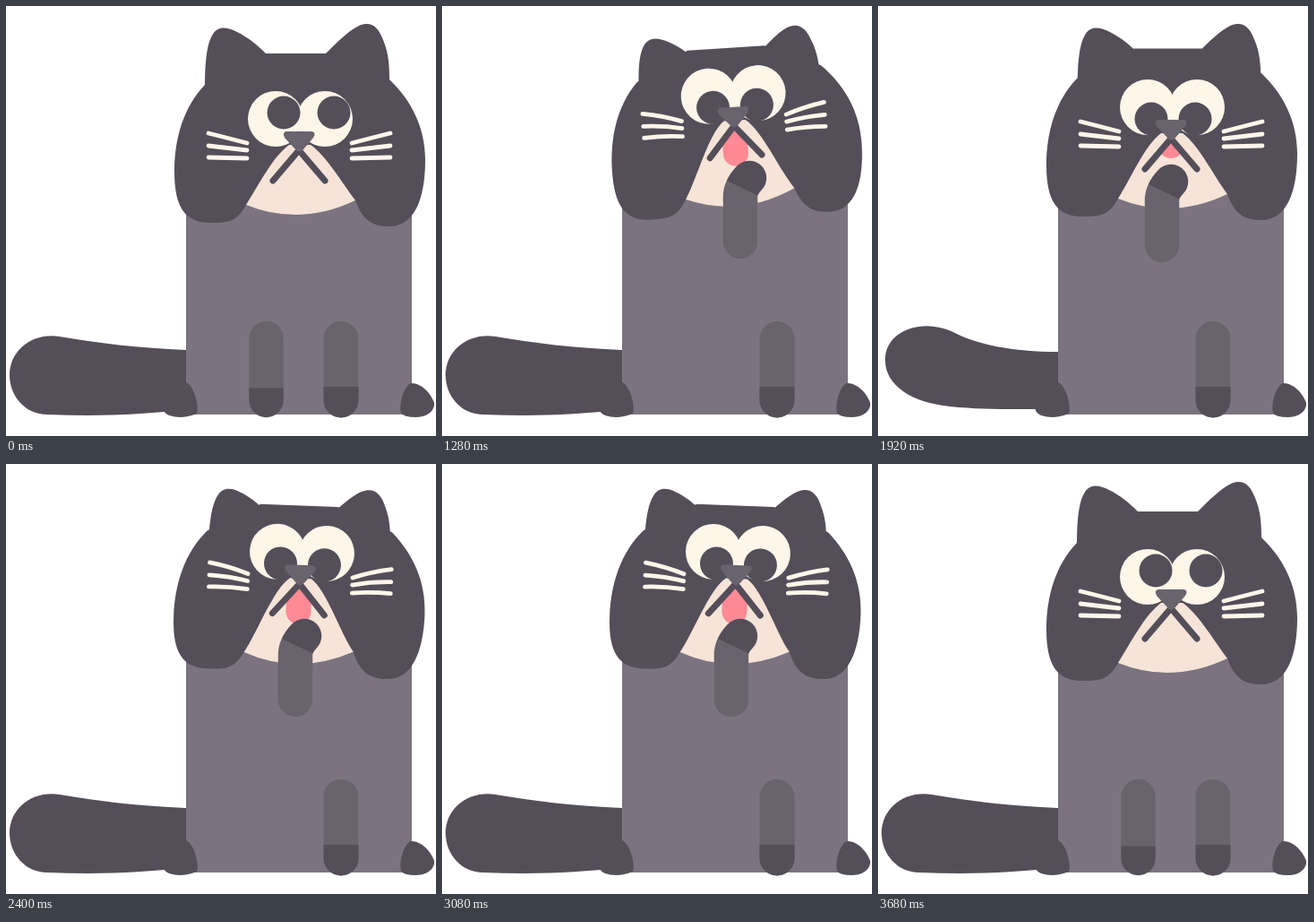
Recreate the animation shown at these times as an HTML page. Size 480 by 480 pixels, loop 3760 ms.

```html
<!DOCTYPE html>
<html lang="en">
<head>
<meta charset="utf-8">
<title>Cat washing its paw</title>
<style>
  html, body { margin: 0; width: 100%; height: 100%; overflow: hidden; background: #fff; }
  svg { display: block; width: 100vw; height: 100vh; }
  .dark { fill: #544e59; }
  .leg { fill: #69636d; }
  .cream { fill: #fdf6e9; }
  .line { fill: none; stroke-linecap: round; stroke-linejoin: round; }
</style>
</head>
<body>
<svg viewBox="0 0 480 480">
  <defs>
    <linearGradient id="sock" gradientUnits="userSpaceOnUse">
      <stop offset="0" stop-color="#69636d"/>
      <stop offset="1" stop-color="#544e59"/>
    </linearGradient>
    <clipPath id="lips"><path d="M327 161L287 205V260H367V205Z"/></clipPath>
  </defs>

  <path id="tail" class="dark"/>
  <rect x="201" y="180" width="252" height="276" rx="2" fill="#7b7480"/>
  <path class="dark" d="M201 420C210 424 216 446 213 455Q196 462 182 457Q172 452 178 445Q186 436 190 425Z"/>
  <path class="dark" d="M452 421C444 424 438 446 441 454Q443 459 458 459C472 459 479 450 478 443C474 432 464 421 452 421Z"/>
  <rect class="leg" x="354.5" y="352" width="39" height="107.5" rx="19.5"/>
  <path class="dark" d="M354.5 425H393.5V440A19.5 19.5 0 0 1 354.5 440Z"/>

  <g id="head">
    <path id="earL" class="dark" d="M222 95C222 70 223 45 230 33C236 22 246 23 258 29C270 35 280 43 290 53V110H222Z"/>
    <path id="earR" class="dark" d="M357 53C370 40 382 28 394 22C408 16 416 24 421 38C427 52 428 66 428 82V110H357Z"/>
    <path id="skull" class="dark"/>
    <path id="muzzle" fill="#f6e4d8"/>
    <g id="face">
      <circle class="cream" cx="301" cy="126" r="31"/>
      <circle class="cream" cx="356" cy="126" r="31"/>
      <circle id="pupilL" class="dark" r="18.5"/>
      <circle id="pupilR" class="dark" r="18.5"/>
      <rect id="lid" class="dark" x="268" y="90" width="121"/>
      <path id="whiskers" class="line" stroke="#fdf6e9" stroke-width="4.8"/>
      <use href="#whiskers" transform="translate(655 0) scale(-1 1)"/>
      <g clip-path="url(#lips)"><rect id="tongue" x="313" y="140" width="28" rx="14" fill="#fd8a95"/></g>
      <path class="line" stroke="#544e59" stroke-width="7" d="M298 195L327 161L356 195"/>
      <path class="leg" d="M313 140H341Q347 141 343 147L332 160Q327 165 323 160L311 147Q308 141 313 140Z"/>
    </g>
  </g>
  <path id="paw" class="line" stroke="url(#sock)" stroke-width="38.5"/>
</svg>

<script>
const LOOP = 3760, STEP = 40;
const LICK = 362, FIRST = 1144, LICKS = 6;

const set = (id, attrs) => {
  const node = document.getElementById(id);
  for (const k in attrs) node.setAttribute(k, attrs[k]);
};
const clamp = v => Math.min(1, Math.max(0, v));
const mix = (a, b, k) => a + (b - a) * k;
const ramp = (t, from, to) => {
  const k = clamp((t - from) / (to - from));
  return k * k * (3 - 2 * k);
};
// Rises between a and b, falls between c and d
const swell = (t, a, b, c, d) => ramp(t, a, b) - ramp(t, c, d);

// 0 with the head low, 1 with it tossed back; rests a moment at both ends
function lickAt(t) {
  const n = (t - FIRST) / LICK;
  return n < 0 || n > LICKS ? 0 : clamp(0.5 - 0.85 * Math.cos(n * 2 * Math.PI));
}

function drawTail(k) {
  set('tail', { d: `M201 ${384 + 2 * k}
    C150 ${382 + 4 * k} ${100 + 10 * k} ${376 + 2 * k} ${60 + 24 * k} ${369 - 5 * k}
    C${30 + 20 * k} ${364 - 16 * k} ${4 + 4 * k} ${384 - 22 * k} ${4 + 4 * k} ${412 - 17 * k}
    C${4 + 4 * k} ${436 - 11 * k} ${22 + 18 * k} ${456 - 13 * k} ${46 + 34 * k} ${456 - 9 * k}
    C${100 + 20 * k} ${458 - 7 * k} 150 ${457 - 7 * k} 201 450Z` });
}

function drawHead(raise, lick, side, lid, look) {
  const drop = 7 * raise + 9 * lick;
  const shift = -6 * raise - 11.5 * lick;
  const tilt = lick * mix(-3.7, 2.2, side);
  const bend = 2 * lick;

  set('head', { transform: `translate(0 ${-7 * raise - 2.7 * lick}) rotate(${tilt} 328 160)` });
  set('earL', { transform: `translate(${drop * 0.1} ${drop})` });
  set('earR', { transform: `translate(${drop * -0.1} ${drop})` });
  set('skull', { d: `M222 88C198 113 188 148 188 185C188 225 200 242 228 242C250 242 258 240 268 222
    Q328 246.5 390 217C398 240 410 246 428 246C456 246 468 215 468 172C468 135 452 105 428 82
    L${357 + drop * 0.6} ${53 + drop * 0.2}H${290 - drop * 0.6}Z` });
  set('muzzle', { d: `M316 ${155 + shift}C298 ${168 + shift} 282 200 268 222
    Q328 246.5 390 217C375 197 358 ${168 + shift} 340 ${155 + shift}Z` });
  set('face', { transform: `translate(0 ${shift})` });
  set('pupilL', { cx: mix(310, 305, look), cy: mix(119, 139, look) });
  set('pupilR', { cx: mix(366, 354, look), cy: mix(119, 139, look) });
  set('lid', { height: 54 * lid });
  set('tongue', { height: 21 + 22 * raise + 23 * lick });
  set('whiskers', {
    transform: `translate(0 ${-bend / 2})`,
    d: [[142, 153], [156, 161], [169, 170]]
      .map(([tip, root]) => `M226 ${tip}Q248 ${(tip + root) / 2 - bend} 269 ${root}`).join('')
  });
}

function drawPaw(raise, lick, side) {
  const x = mix(290.5, 317, raise) + lick * mix(16, 6, side);
  const y = mix(371, 267, raise) - 4 * lick;
  const bend = y + mix(47, -50, raise);
  const tipX = x + 10 * raise, tipY = y + mix(69, -71, raise);

  // The dark sock begins a little short of the paw's tip
  const len = Math.hypot(tipX - x, tipY - bend) || 1;
  const nx = (tipX - x) / len, ny = (tipY - bend) / len;
  const x1 = tipX - nx * 14, y1 = tipY - ny * 14;
  set('sock', { x1, y1, x2: x1 + nx, y2: y1 + ny });
  set('paw', { d: `M${x} ${y}L${x} ${bend}Q${x} ${(bend + tipY) / 2} ${tipX} ${tipY}` });
}

function draw(t) {
  const raise = swell(t, 800, 1120, 3300, 3640);
  const lick = lickAt(t);
  const side = ramp(t, 1700, 2060);
  drawTail(swell(t, 1400, 1880, 1960, 2360));
  drawHead(raise, lick, side, swell(t, 400, 700, 760, 920), swell(t, 760, 920, 3320, 3600));
  drawPaw(raise, lick, side);
}

const start = performance.now();
function frame() {
  const t = (performance.now() - start) % LOOP;
  draw(Math.floor(t / STEP) * STEP);
  requestAnimationFrame(frame);
}
frame();
</script>
</body>
</html>
```
